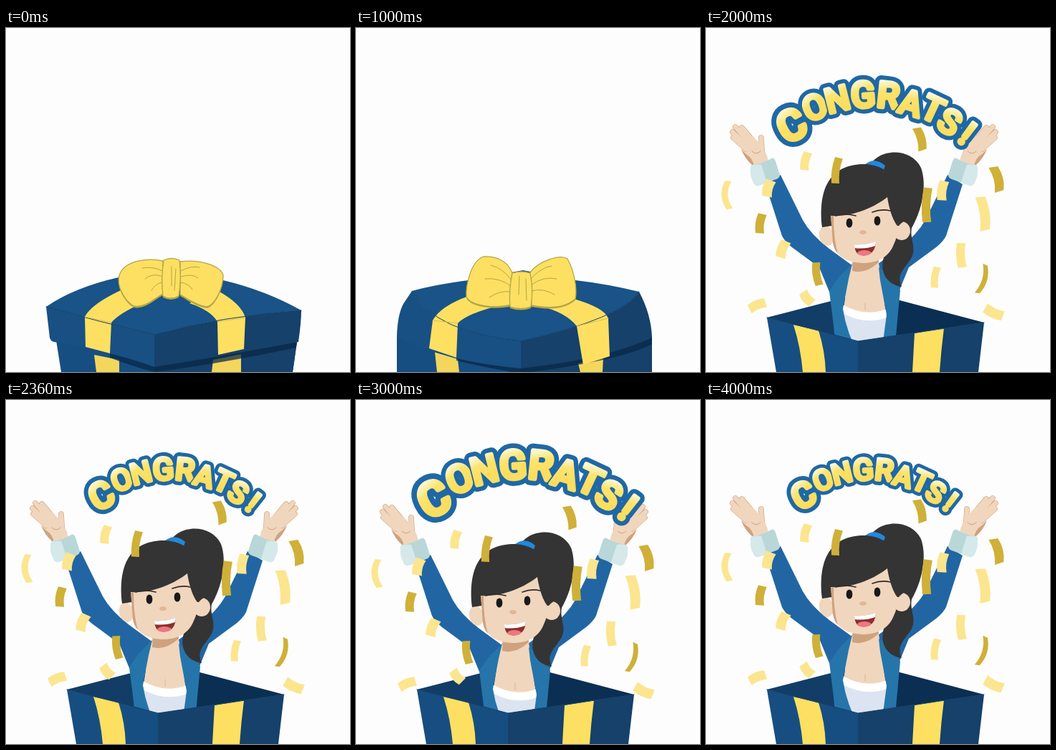
Recreate the animation shown at these times as an HTML page with a canvas. Size 480 by 480 pixels, loop 4040 ms.

```html
<!DOCTYPE html>
<html lang="en">
<head>
<meta charset="utf-8">
<title>Congrats</title>
<style>
html, body { margin: 0; width: 100%; height: 100%; overflow: hidden; background: #fdfdfd; }
canvas { display: block; width: 480px; height: 480px; }
</style>
</head>
<body>
<canvas id="stage" width="480" height="480"></canvas>
<script>
const ctx = document.getElementById('stage').getContext('2d');
const LOOP = 4040, OPEN = 1160;
const NAVY = '#174e81', DEEP = '#15416a', YELLOW = '#fde062', OLIVE = '#b5a546';
const SKIN = '#f0d6bd', TAN = '#cfa27e', HAIR = '#343434';

const clamp = v => Math.max(0, Math.min(1, v));
const easeOut = u => 1 - (1 - clamp(u)) ** 3;

// Smooth curve through [time, value] pairs
function curve(keys, t) {
  const n = keys.length - 1;
  if (t <= keys[0][0]) return keys[0][1];
  if (t >= keys[n][0]) return keys[n][1];
  let i = 0;
  while (t > keys[i + 1][0]) i++;
  const slope = k => k < 1 || k >= n ? 0
    : (keys[k + 1][1] - keys[k - 1][1]) / (keys[k + 1][0] - keys[k - 1][0]);
  const [t0, a] = keys[i], [t1, b] = keys[i + 1];
  const d = t1 - t0, u = (t - t0) / d, v = 1 - u;
  return a * v * v * (1 + 2 * u) + b * u * u * (3 - 2 * u) +
    d * u * v * (v * slope(i) - u * slope(i + 1));
}

// Blend two path strings that share one structure
function blend(a, b, p) {
  const to = b.match(/\d+/g);
  let i = 0;
  return a.replace(/\d+/g, n => (+n + (to[i++] - n) * p).toFixed(2));
}

function fill(d, color) {
  ctx.fillStyle = color;
  ctx.fill(new Path2D(d));
}

function line(d, color, width = 1) {
  ctx.strokeStyle = color;
  ctx.lineWidth = width;
  ctx.lineCap = ctx.lineJoin = 'round';
  ctx.stroke(new Path2D(d));
}

function oval(x, y, rx, ry, color, turn = 0) {
  ctx.fillStyle = color;
  ctx.beginPath();
  ctx.ellipse(x, y, rx, ry, turn, 0, 7);
  ctx.fill();
}

function group(draw, x = 0, y = 0, turn = 0, scale = 1, ox = 0, oy = 0) {
  ctx.save();
  ctx.translate(x + ox, y + oy);
  ctx.rotate(turn);
  ctx.scale(scale, scale);
  ctx.translate(-ox, -oy);
  draw();
  ctx.restore();
}

/* ---------- closed gift ---------- */

const BODY = [
  ['M70 436L77 480L400 480L406 438L207 460Z', 'M57 430L57 480L413 480L413 432L230 460Z', NAVY],
  ['M207 460L207 480L400 480L406 438Z', 'M230 460L230 480L413 480L413 432Z', DEEP],
  ['M123 456L158 463L158 480L126 480Z', 'M110 452L142 462L144 480L113 480Z', '#f3d65c'],
  ['M289 463L328 455L328 480L287 480Z', 'M310 468L345 460L344 480L313 480Z', '#f3d65c'],
  ['M145 450L207 470L406 436L405 446Q290 470 207 480Q170 470 145 460Z',
   'M140 455L230 472L413 430L413 441Q370 464 230 482Q180 474 140 464Z', 'rgba(8,38,70,.72)']
];

const LID = [
  ['M56 389Q130 410 207 428L207 473Q150 452 67 438Q62 437 61 432Z',
   'M78 367Q110 425 230 437L230 475Q120 465 57 430Q58 400 66 385Z', '#185084'],
  ['M412 394Q300 402 207 428L207 473Q290 460 408 438Q412 410 412 394Z',
   'M395 368Q372 405 230 437L230 475Q350 462 413 432Q412 400 395 368Z', DEEP],
  ['M56 389Q95 362 157 348L232 335L303 352Q362 366 412 394Q300 402 207 428Q130 410 56 389Z',
   'M78 367Q110 358 157 352L233 338L306 352Q350 357 395 368Q372 405 230 437Q110 425 78 367Z', '#195387'],
  ['M160 366Q118 386 110 403L111 445L145 454L147 411Q158 398 190 384Z',
   'M157 374Q118 388 107 408L102 447L140 460L142 412Q155 398 205 386Z', YELLOW],
  ['M298 368Q328 385 334 404L332 448L296 456L295 410Q286 394 256 384Z',
   'M304 378Q346 390 352 405L354 458L317 470L308 416Q292 396 256 388Z', YELLOW]
];

const LID_LINES = [
  ['M56 389Q130 410 207 428Q300 402 412 394', 'M78 367Q110 425 230 437Q372 405 395 368', '#123f69'],
  ['M110 403L147 411M295 410L334 404', 'M107 408L142 412M308 416L352 405', '#d9bd50']
];

const BOW = [
  ['M219 325C195 320 165 325 158 345C154 360 165 380 178 388C195 391 208 376 219 371Z',
   'M218 342C212 325 195 318 178 319C160 325 153 360 154 375C160 388 195 392 217 386Z'],
  ['M243 326C270 322 300 332 303 345C303 365 290 388 280 389C262 386 250 375 243 372Z',
   'M243 341C255 325 285 315 295 322C305 340 309 365 306 378C290 392 265 391 245 387Z'],
  ['M220 324Q231 319 242 324Q245 350 241 374Q230 380 219 374Q216 350 220 324Z',
   'M218 342Q231 338 243 342Q248 365 244 389Q230 394 215 389Q213 365 218 342Z']
];

const FOLDS = [
  'M218 339Q204 332 190 335M217 346Q203 342 194 350M217 355Q207 358 203 366M244 339Q258 331 270 334M244 347Q260 342 268 349M244 355Q256 357 260 365M231 333L231 360M237 336L235 366',
  'M217 352Q205 335 188 331M216 360Q200 348 180 350M215 368Q200 366 186 376M244 350Q258 334 273 332M245 358Q262 346 280 350M245 367Q260 362 277 372M228 346L227 372M237 350L238 380'
];

function drawParts(parts, p) {
  for (const [a, b, color] of parts) fill(blend(a, b, p), color);
}

function drawLid(p) {
  drawParts(LID, p);
  for (const [a, b, color] of LID_LINES) line(blend(a, b, p), color);
  for (const [a, b] of BOW) {
    const d = blend(a, b, p);
    group(() => fill(d, OLIVE), 0, 2);
    fill(d, YELLOW);
    line(d, OLIVE, 1.3);
  }
  line(blend(...FOLDS, p), OLIVE, 1);
}

function flyLid(t) {
  const u = (t - OPEN) / 360;
  if (u > 1.45) return;
  const p = 0.53 * (1 - clamp(u));
  group(() => drawLid(p), 182 * u ** 3, -281 * u ** 1.5,
    0.49 * u * u, 1 - 0.07 * clamp(u), 230, 350);
}

/* ---------- open box ---------- */

function drawInside() {
  fill('M85 404L225 368L225 437L212 437Z', '#123d67');
  fill('M225 368L388 411L212 437L225 420Z', '#0b2f52');
}

function drawFront() {
  fill('M85 404Q150 420 212 437L212 480L98 480Z', NAVY);
  fill('M212 437L388 411L380 480L212 480Z', DEEP);
  fill('M122 414L157 422Q166 450 167 480L135 480Q132 445 122 414Z', YELLOW);
  fill('M291 426L332 419Q328 450 326 480L288 480Z', YELLOW);
  line('M85 404Q150 420 212 437L388 411', '#123f69');
}

/* ---------- person ---------- */

function drawArm() {
  fill('M83 218L106 290Q110 298 120 306L158 334L172 368L205 332L172 308Q146 288 135 268L104 205Z', '#2166a3');
  fill('M67 193Q66 182 54 174Q46 167 50 157L64 150L75 163Q85 172 87 186Q76 195 67 193Z', SKIN);
  fill('M67 193Q66 182 55 175L49 169Q54 182 64 191Z', TAN);
  const fingers = 'M56 169L38 153M57 164L37 145M60 160L41 138M66 158L50 139M78 170L77 153';
  line(fingers, TAN, 7.6);
  line(fingers, SKIN, 6.4);
  fill('M53 158L64 150L77 163L82 174L70 180L56 172Z', SKIN);
  line('M64 172Q70 178 76 172', TAN, 1);
  fill('M64 191Q80 189 91 182Q95 180 97 186L103 205Q103 209 98 211L73 220Q68 221 66 215Q61 205 62 195Z', '#b9d7d9');
  fill('M64 191Q75 190 77 191Q82 205 85 216L73 220Q68 221 66 215Q61 205 62 195Z', '#d5e9ea');
}

function drawBody() {
  drawArm();
  ctx.save();
  ctx.translate(441, 0);
  ctx.scale(-1, 1);
  drawArm();
  ctx.restore();
  fill('M205 322L240 322L244 345L252 405L190 405L198 350Z', SKIN);
  fill('M205 322L241 318L241 327Q222 344 204 339Z', TAN);
  line('M222 384L222 393', '#dbb491', 1);
  fill('M191 386Q222 404 252 392L252 460L190 460Z', '#fff');
  fill('M191 398Q222 415 252 404L252 460L190 460Z', '#dce4f2');
  fill('M204 329L185 348L172 367L178 415L182 460L215 460Q196 425 191 392L199 350Z', '#2575aa');
  fill('M241 334L262 350L271 366L265 430L262 460L244 460L252 400L243 352Z', '#2575aa');
}

function drawHead() {
  fill('M226 198C235 168 285 164 300 195C309 220 301 255 287 279C284 294 294 306 287 320C278 336 265 342 273 361C252 358 242 340 248 320C258 306 267 292 262 270Z', HAIR);
  fill('M221 191Q235 179 250 192L247 201Q236 191 224 194Z', '#2388dc');
  oval(168, 290, 10, 14, SKIN, -0.2);
  oval(273, 283, 12, 13, SKIN);
  fill('M162 278C155 214 181 189 223 190C260 193 281 222 282 268Q276 268 269 276L176 276Z', HAIR);
  fill('M174 262C205 264 235 250 253 236C256 256 262 270 267 276Q268 290 262 302C255 320 240 327 222 328C198 328 182 320 178 300Z', SKIN);
  fill('M174 263L177 300Q179 310 184 315Q178 295 178 263Z', TAN);
  line('M181 262Q194 258 209 262M232 257Q245 252 257 255', '#332a27', 1.7);
  oval(200, 272, 4.4, 6.6, '#191919');
  oval(239, 269, 4.4, 6.6, '#191919');
  oval(219, 285, 5, 3, '#e5b498');
  const mouth = 'M207 302Q222 303 237 298Q237 311 228 316Q218 320 211 315Q207 310 207 302Z';
  ctx.save();
  ctx.clip(new Path2D(mouth));
  fill(mouth, '#8d302c');
  oval(221, 316, 11, 6, '#ee7682');
  fill('M206 301Q222 303 238 296L236 304Q222 309 207 307Z', '#fff');
  ctx.restore();
}

/* ---------- confetti ---------- */

// x, y, width, height, tilt in degrees, dark or light, bend
const PIECES = [
  [32, 233, 9, 40, -3, 0, -12], [77, 273, 12, 28, 8, 1], [88, 224, 14, 24, 15, 0],
  [140, 186, 12, 26, 12, 0], [183, 199, 11, 37, 8, 1], [298, 155, 12, 33, -15, 1, 5],
  [331, 227, 13, 28, 8, 0], [309, 247, 12, 49, 2, 1], [405, 211, 13, 36, -14, 1, 6],
  [386, 259, 14, 48, -8, 0, 6], [357, 317, 12, 35, -3, 0], [384, 350, 7, 42, 16, 1, 10],
  [321, 348, 10, 30, 8, 0], [108, 309, 14, 25, 20, 0], [156, 343, 11, 33, -8, 1],
  [142, 376, 13, 21, -40, 0], [72, 388, 13, 25, 68, 0], [402, 396, 14, 28, -65, 0]
];

function drawPiece(x, y, w, h, tilt, dark, bend = -4) {
  group(() => {
    const a = w / 2, b = h / 2;
    fill(`M${-a} ${-b}L${a} ${-b + 1}Q${a + bend} 0 ${a} ${b - 1}L${-a} ${b}Q${-a + bend} 0 ${-a} ${-b}Z`,
      dark ? '#cfb038' : '#fce58f');
  }, x, y, tilt * Math.PI / 180);
}

function drawPile(t) {
  const rise = curve([[1260, 60], [1420, -8], [1520, 0], [1720, 60]], t);
  for (let i = 0; i < 20; i++) {
    const r = n => (Math.sin(i * 12.99 + n * 78.2) * 43758.5 % 1 + 1) % 1;
    const left = i < 10, j = i % 10;
    const x = (left ? 118 : 268) + j * (left ? 6.5 : 9.5);
    const y = (left ? 404 + j * 0.9 : 414 - j * 0.8) + r(1) * 10;
    drawPiece(x, y + rise, 9, 18, r(2) * 80 - 40, r(3) < 0.6);
  }
}

/* ---------- lettering ---------- */

// letter, x, y, tilt in degrees, size
const WORD = [
  ['C', 108, 137, -27, 1.22], ['O', 144, 109, -22, 1], ['N', 179, 97, -14, 1],
  ['G', 219, 90, -4, 1.05], ['R', 258, 91, 6, 1.05], ['A', 293, 103, 16, 1],
  ['T', 327, 112, 25, 1], ['S', 353, 132, 31, 1], ['!', 380, 150, 37, 1]
];

function drawWord() {
  const shine = ctx.createLinearGradient(-6, -22, 3, 10);
  shine.addColorStop(0, '#fffbe2');
  shine.addColorStop(0.45, '#fde46f');
  shine.addColorStop(1, '#fbdd60');
  ctx.font = '500 53px Roboto, sans-serif';
  ctx.textAlign = 'center';
  ctx.textBaseline = 'alphabetic';
  ctx.lineJoin = ctx.lineCap = 'round';
  const paint = (ch, color, width) => {
    ctx.strokeStyle = ctx.fillStyle = color;
    ctx.lineWidth = width;
    ctx.strokeText(ch, 0, 19);
    ctx.fillText(ch, 0, 19);
  };
  const each = draw => {
    for (const [ch, x, y, tilt, size] of WORD) {
      group(() => draw(ch), x, y, tilt * Math.PI / 180, size);
    }
  };
  each(ch => paint(ch, '#1f68a6', 18));
  // A thin rim keeps neighbouring letters apart
  each(ch => {
    paint(ch, '#1f68a6', 9);
    paint(ch, shine, 5.5);
  });
}

/* ---------- timeline ---------- */

const WORD_WIDTH = [[1360, 0], [1520, 281], [1740, 393], [2000, 292], [2340, 251],
  [2820, 323], [3000, 323], [3360, 288], [3700, 258], [4000, 244]];
const BOB = [[1480, 40], [1520, 26], [1640, 5], [2000, 0], [2360, 6], [2680, 12],
  [3000, 11], [3500, 4], [4000, -1]];
const DRIFT = [[1520, 9], [2000, 0], [2360, 2], [3000, 9], [4000, 0]];

function render(t) {
  ctx.fillStyle = '#fdfdfd';
  ctx.fillRect(0, 0, 480, 480);
  if (t < OPEN) {
    const p = 0.5 - 0.5 * Math.cos(t * 3 * Math.PI / 1000);
    drawParts(BODY, p);
    drawLid(p);
    return;
  }
  const lidInFront = t < 1320;
  drawInside();
  if (!lidInFront) flyLid(t);
  const grow = easeOut((t - 1240) / 240);
  if (grow > 0) {
    group(() => { drawBody(); drawHead(); }, 0, curve(BOB, t), 0, grow, 225, 440);
  }
  if (t > 1260 && t < 1720) drawPile(t);
  drawFront();
  if (lidInFront) flyLid(t);
  if (grow > 0) {
    group(() => PIECES.forEach(c => drawPiece(...c)), 0, curve(DRIFT, t), 0, grow, 236, 420);
  }
  const width = curve(WORD_WIDTH, t);
  if (width > 1) group(drawWord, 0, 0, 0, width / 323, 221, 117);
}

const start = performance.now();
function tick(now) {
  render(Math.max(0, now - start) % LOOP);
  requestAnimationFrame(tick);
}
render(0);
requestAnimationFrame(tick);
</script>
</body>
</html>
```
